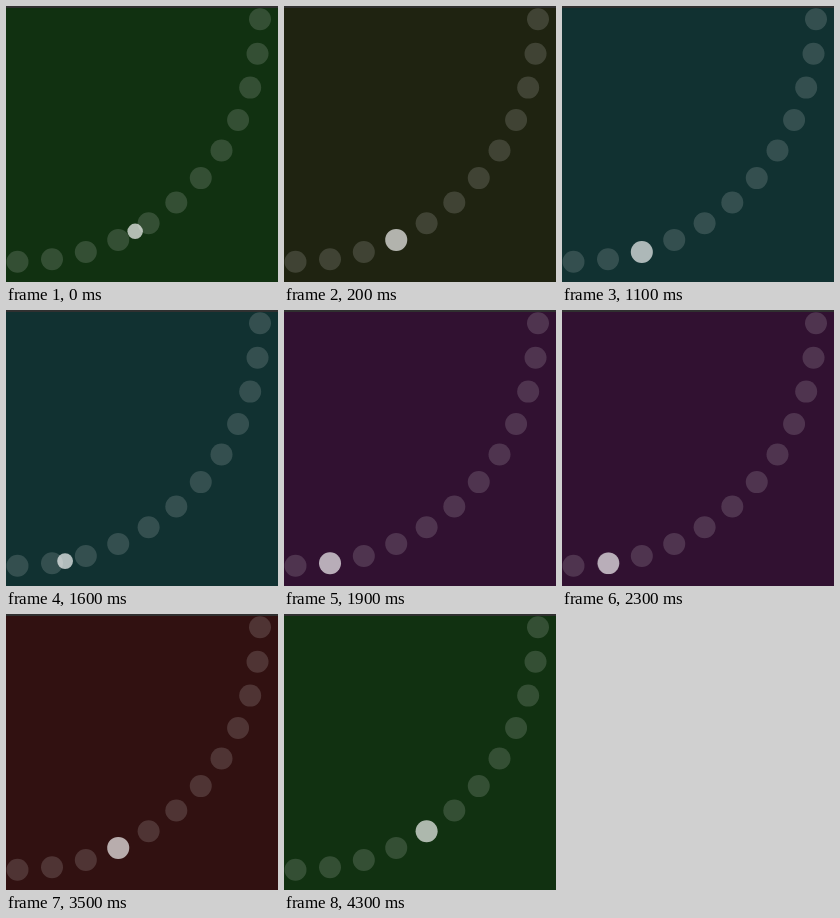
Write an HTML page that moves like this. It is 272 by 276 pixels and loops after 4.8 s.

```html
<!DOCTYPE html>
<html lang="en">
<head>
<meta charset="utf-8">
<title>Dots on an arc</title>
<style>
  html, body { margin: 0; width: 100%; height: 100%; overflow: hidden; background: #113111; }
  svg { display: block; width: 272px; height: 276px; }
</style>
</head>
<body>
<svg id="stage" viewBox="0 0 272 276">
  <rect id="back" width="272" height="276"/>
  <rect width="272" height="2" fill="#303030"/>
  <g id="dots" fill="#fff" fill-opacity=".15"></g>
  <circle id="marker" fill="#fff"/>
</svg>
<script>
const LOOP = 4800, TICK = 100;
const MOVE = 200, FADE = 200;
const DOTS = 12, DOT_RADIUS = 11;
const ARC = { x: 11.5, y: 13.3, r: 242.5 };

const COLORS = { 7: [17, 49, 17], 8: [49, 17, 17], 9: [17, 49, 49], 10: [49, 17, 49] };
// Each move leaves one dot for a neighbour at the given time.
const MOVES = [
  { at: -94, from: 7, to: 8 },
  { at: 683, from: 8, to: 9 },
  { at: 1485, from: 9, to: 10 },
  { at: 2285, from: 10, to: 9 },
  { at: 3106, from: 9, to: 8 },
  { at: 3906, from: 8, to: 7 },
  { at: LOOP - 94, from: 7, to: 8 }
];

const back = document.getElementById('back');
const dots = document.getElementById('dots');
const marker = document.getElementById('marker');

const clamp = v => Math.min(1, Math.max(0, v));
const swing = v => 0.5 - Math.cos(v * Math.PI) / 2;
const mix = (a, b, v) => a + (b - a) * v;

function place(circle, index, radius) {
  const angle = index / (DOTS - 1) * Math.PI / 2;
  circle.setAttribute('cx', ARC.x + ARC.r * Math.cos(angle));
  circle.setAttribute('cy', ARC.y + ARC.r * Math.sin(angle));
  circle.setAttribute('r', radius);
}

for (let i = 0; i < DOTS; i++) {
  const dot = document.createElementNS('http://www.w3.org/2000/svg', 'circle');
  place(dot, i, DOT_RADIUS);
  dots.append(dot);
}

function draw(time) {
  const { at, from, to } = MOVES.findLast(move => move.at <= time);
  const moved = swing(clamp((time - at) / MOVE));
  const faded = swing(clamp((time - at - MOVE) / FADE));
  const dip = Math.sin(moved * Math.PI);

  place(marker, mix(from, to, moved), DOT_RADIUS * (1 - 0.3 * dip));
  marker.setAttribute('fill-opacity', 0.6 + 0.08 * dip);

  const color = COLORS[from].map((c, i) => Math.round(mix(c, COLORS[to][i], faded)));
  back.setAttribute('fill', `rgb(${color})`);
}

const start = performance.now();
function frame() {
  const elapsed = (performance.now() - start) % LOOP;
  draw(Math.floor(elapsed / TICK) * TICK);
  requestAnimationFrame(frame);
}
frame();
</script>
</body>
</html>
```
